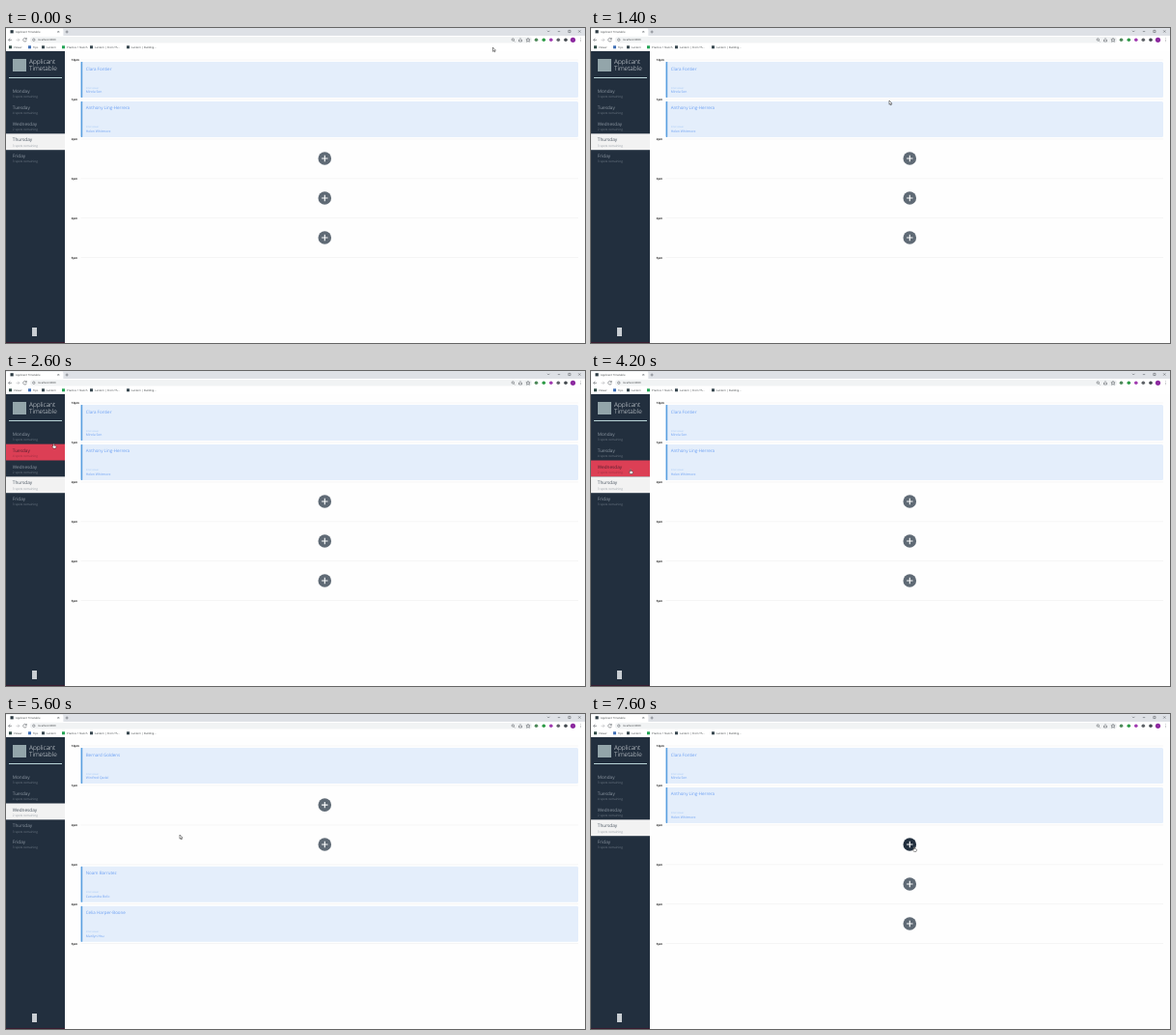
Recreate the animation shown at these times as an HTML page. Size 600x326 px, loop 8000 ms.

```html
<!DOCTYPE html>
<html lang="en">
<head>
<meta charset="utf-8">
<title>Applicant Timetable</title>
<style>
html, body { margin: 0; width: 100%; height: 100%; overflow: hidden; background: #fefefe; }
svg { display: block; width: 100vw; height: 100vh; }
text { font-family: "Open Sans", "Noto Sans", sans-serif; text-rendering: geometricPrecision; }
.chrome text { font-size: 2.75px; fill: #3c4043; }
.icon { fill: none; stroke: #5f6368; stroke-width: .6; }
.brand { font-size: 6.5px; font-weight: 300; fill: #eef2f4; }
.day .name { font-size: 4.7px; fill: #8d97a2; }
.day .spots { font-size: 3.15px; fill: #6f7a86; }
.day rect { fill: transparent; }
.day.hover rect { fill: #dc3f55; }
.day.hover .name { fill: #54202f; }
.day.hover .spots { fill: #9c2f43; }
.day.picked rect { fill: #f2f2f2; }
.day.picked .name { fill: #47525e; }
.day.picked .spots { fill: #9aa1a8; }
.hour { font-size: 2.9px; font-weight: 700; fill: #222; }
.card .who { font-size: 4.5px; fill: #6a9ff3; }
.card .cap { font-size: 2.6px; fill: #a9c9f5; }
.card .by { font-size: 3.4px; fill: #6a9ff3; }
.plus circle { fill: #5f6a75; }
.plus path { stroke: #fff; stroke-width: 1.1; }
.plus.hover circle { fill: #222f3e; }
</style>
</head>
<body>
<svg viewBox="0 0 600 326" preserveAspectRatio="none">
  <g class="chrome">
    <rect width="600" height="8" fill="#dee1e6"/>
    <path d="M0 8V1.4Q0 .6 1 .6H58Q59.4 .6 59.4 2V8Z" fill="#fff"/>
    <rect y="8" width="600" height="16" fill="#fff"/>
    <rect x="25" y="9" width="520" height="6.4" rx="3.2" fill="#f1f3f4"/>
    <rect x="4.5" y="2.2" width="3.2" height="3.2" fill="#2b3a42"/>
    <text x="10" y="4.9">Applicant Timetable</text>
    <text x="33" y="13.2">localhost:8000</text>
    <path class="icon" d="M53.4 3l1.8 1.8m0-1.8l-1.8 1.8M61.6 4h3m-1.5-1.5v3"/>
    <path class="icon" d="M6 12.3H2.6m1.6-1.6l-1.6 1.6l1.6 1.6"/>
    <path class="icon" d="M10.5 12.3h3.4m-1.6-1.6l1.6 1.6l-1.6 1.6" stroke-opacity=".45"/>
    <path class="icon" d="M21 11.2a1.8 1.8 0 1 0 .3 1.5M21.3 10v1.6h-1.6"/>
    <circle class="icon" cx="28.8" cy="12.2" r="1.2"/>
    <path class="icon" d="M561 2.8l1.2 1.2l1.2-1.2M571.8 3.6h2.4M582.8 2.4h2.2v2.2h-2.2zM593.2 2.4l2.2 2.2m0-2.2l-2.2 2.2"/>
    <path class="icon" d="M526.2 13l1.2 1.2M531.5 11.8v2.2h3v-2.2M533 13v-2.8M541 10.4l.6 1.3 1.5.1-1.1 1 .4 1.5-1.4-.8-1.4.8.4-1.5-1.1-1 1.5-.1z"/>
    <circle class="icon" cx="525.3" cy="12" r="1.2"/>
    <g id="icons"></g>
    <g fill="#5f6368"><circle cx="595.5" cy="10.8" r=".4"/><circle cx="595.5" cy="12.3" r=".4"/><circle cx="595.5" cy="13.8" r=".4"/></g>
    <g id="marks"></g>
  </g>
  <g id="side">
    <rect y="24" width="61" height="302" fill="#222f3e"/>
    <rect y="325" width="61" height="1" fill="#3a1c30"/>
    <rect x="7" y="32" width="14" height="13" fill="#93a5aa"/>
    <text class="brand" x="24" y="37.4">Applicant</text>
    <text class="brand" x="24" y="43.6">Timetable</text>
    <rect x="3" y="51" width="55" height="1" fill="#b9d5d8"/>
    <rect x="27" y="310" width="5" height="9" fill="#c9ced3"/>
    <g id="days"></g>
  </g>
  <g id="hours"></g>
  <g id="views"></g>
  <g id="cursor">
    <path id="arrow" d="M0 0V4.3L1 3.4L1.7 4.9L2.3 4.6L1.7 3.2H3Z" fill="#fff" stroke="#222" stroke-width=".5"/>
    <path id="hand" d="M-.5 .5Q0-.3 .5 .5V2L2.2 2.4Q2.7 2.6 2.5 3.4L2 4.9H-.4L-1.6 3.1Q-1.7 2.4-.5 2.8Z" fill="#fff" stroke="#222" stroke-width=".45"/>
  </g>
</svg>
<script>
const NS = "http://www.w3.org/2000/svg";
const byId = id => document.getElementById(id);

function add(parent, tag, attrs, content) {
  const el = document.createElementNS(NS, tag);
  for (const k in attrs) el.setAttribute(k, attrs[k]);
  if (content) el.textContent = content;
  parent.appendChild(el);
  return el;
}
const label = (parent, cls, x, y, s) => add(parent, "text", { class: cls, x, y }, s);

// Browser toolbar
[[549.5, "#4f8a5b"], [557.3, "#2e9b47"], [564.8, "#a03bb0"], [572.3, "#5f6368"], [580, "#444a50"], [587.5, "#8d2aa0"]]
  .forEach(([cx, fill], i) => add(byId("icons"), "circle", { cx, cy: 12.3, r: i === 5 ? 2.6 : 1.8, fill }));

[[3, "#2f4a45", "Viewer"], [23, "#3f6fb5", "Tips"], [37, "#37474f", "Lantern"], [58, "#23a455", "Practice 1 Sketch"],
 [87, "#37474f", "Lantern | From Th..."], [125, "#37474f", "Lantern | Building..."]]
  .forEach(([x, fill, s]) => {
    add(byId("marks"), "rect", { x, y: 18.3, width: 3, height: 3, fill });
    label(byId("marks"), "", x + 5, 20.8, s);
  });

// Sidebar
const ROW = 16.85, TOP = 58.8;
const days = [["Monday", 3], ["Tuesday", 4], ["Wednesday", 2], ["Thursday", 3], ["Friday", 3]].map(([name, n], i) => {
  const y = TOP + i * ROW, g = add(byId("days"), "g", { class: "day" });
  add(g, "rect", { y, width: 61, height: ROW });
  label(g, "name", 6.8, y + 8.1, name);
  label(g, "spots", 6.8, y + 13.2, n + " spots remaining");
  return g;
});

// Timetable
const SLOT = 40.95;
["12pm", "1pm", "2pm", "3pm", "4pm", "5pm"].forEach((s, i) => {
  const y = 33 + i * SLOT;
  label(byId("hours"), "hour", 67.8, y + 1, s);
  add(byId("hours"), "rect", { x: 77.5, y: y - .3, width: 515.5, height: .6, fill: "#efefef" });
});

function makeView(slots) {
  const el = add(byId("views"), "g", {}), pluses = [];
  slots.forEach((slot, i) => {
    const y = 35 + i * SLOT;
    if (slot) {
      const g = add(el, "g", { class: "card" });
      add(g, "rect", { x: 77.6, y, width: 515.4, height: 37, rx: 1.5, fill: "#e4eefb" });
      add(g, "rect", { x: 77.6, y, width: 1.6, height: 37, rx: .6, fill: "#5a9fe0" });
      label(g, "who", 82.7, y + 8.5, slot[0]);
      label(g, "cap", 82.7, y + 27.5, "Interviewer");
      label(g, "by", 82.7, y + 32, slot[1]);
    } else {
      const cy = 94.1 + (i - 1) * SLOT;
      const g = add(el, "g", { class: "plus", transform: `translate(330.3 ${cy})` });
      add(g, "circle", { r: 6.8 });
      add(g, "path", { d: "M-3.2 0H3.2M0-3.2V3.2" });
      pluses.push({ g, cy });
    }
  });
  return { el, pluses };
}
const views = {
  2: makeView([["Bernard Goldens", "Winifred Qadal"], null, null, ["Noam Barrutez", "Cassandra Belic"], ["Celia Harper-Boone", "Marilyn Hsu"]]),
  3: makeView([["Clara Fontier", "Mirela Sen"], ["Anthony Ling-Herrera", "Helen Whitmore"], null, null, null])
};

// Pointer path: time, x, y
const path = [
  [0, 504.5, 20], [500, 504.5, 20], [1000, 420, 46], [1400, 309, 75], [1800, 200, 80], [2300, 54, 68], [2600, 49.5, 75.2],
  [2900, 54, 90], [3200, 55, 102], [3400, 55, 102], [3700, 43, 102], [3900, 43, 102], [4200, 41, 101.5],
  [4600, 41, 101.5], [5200, 326, 136], [5400, 333, 138], [5500, 260, 131], [5600, 180, 125],
  [5800, 58, 122], [6000, 44, 122], [6100, 44, 122], [6300, 37, 124.5], [6600, 37, 124.5],
  [7000, 170, 130], [7300, 318, 136], [7600, 335, 137.5], [8000, 335, 137.5]
];

function pointer(t) {
  const i = path.findIndex(p => p[0] > t), a = path[i - 1], b = path[i];
  const k = (t - a[0]) / (b[0] - a[0]);
  return [a[1] + (b[1] - a[1]) * k, a[2] + (b[2] - a[2]) * k];
}

function draw(t) {
  const [x, y] = pointer(t);
  const picked = t >= 4600 && t < 6500 ? 2 : 3;
  const over = x < 61 ? Math.floor((y - TOP + .6) / ROW) : -1;
  let hot = over >= 0 && over < days.length;
  days.forEach((g, i) => {
    g.classList.toggle("picked", i === picked);
    g.classList.toggle("hover", i === over);
  });
  for (const id in views) {
    const shown = +id === picked;
    views[id].el.style.display = shown ? "" : "none";
    views[id].pluses.forEach(({ g, cy }) => {
      const hit = shown && Math.hypot(x - 330.3, y - cy) < 6.8;
      g.classList.toggle("hover", hit);
      hot = hot || hit;
    });
  }
  byId("cursor").setAttribute("transform", `translate(${x} ${y})`);
  byId("arrow").style.display = hot ? "none" : "";
  byId("hand").style.display = hot ? "" : "none";
}

const start = performance.now();
function tick() {
  const t = (performance.now() - start) % 8000;
  draw(Math.floor(t / 100) * 100);
  requestAnimationFrame(tick);
}
tick();
</script>
</body>
</html>
```
